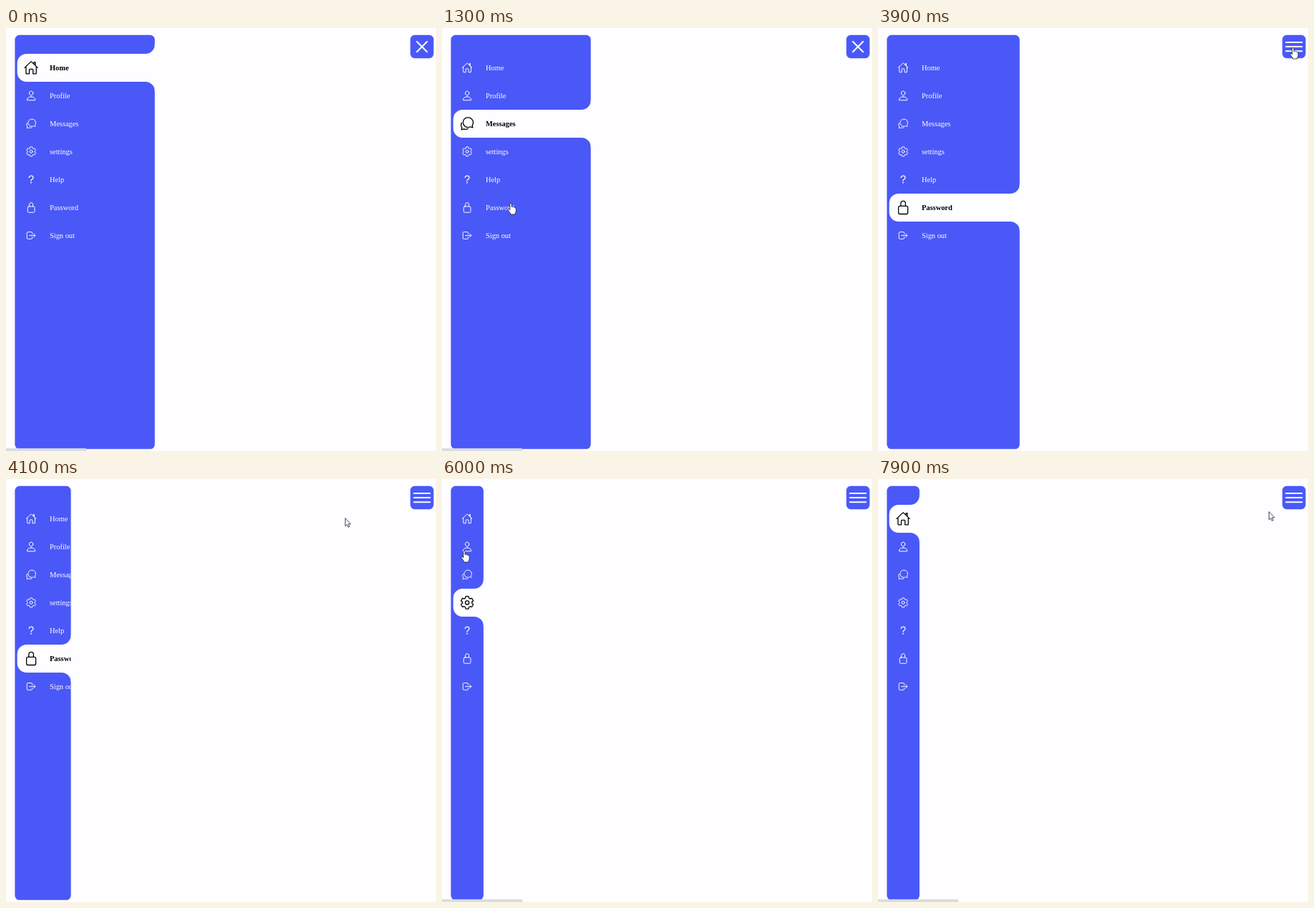
Recreate the animation shown at these times as an HTML page. Size 600 by 590 pixels, loop 8 s.

```html
<!DOCTYPE html>
<html lang="en">
<head>
<meta charset="utf-8">
<title>Sidebar menu</title>
<style>
html, body { margin: 0; width: 100%; height: 100%; overflow: hidden; background: #fefdff; }
svg { display: block; width: 600px; height: 590px; }
text { font: 10.4px "Liberation Serif", "Times New Roman", serif; }
.icon { fill: none; stroke-width: 32; stroke-linecap: round; stroke-linejoin: round; }
</style>
</head>
<body>
<svg viewBox="0 0 600 590">
  <defs><clipPath id="clip"><rect id="clipBox" x="0" y="0" height="590"/></clipPath></defs>
  <rect width="600" height="590" fill="#fefdff"/>
  <rect id="panel" x="12.4" y="9.8" height="577.5" rx="6.5" fill="#4a58f8"/>
  <path id="notch" fill="#fefdff"/>
  <g id="items" clip-path="url(#clip)"></g>
  <rect x="564.2" y="9.8" width="32.5" height="32.5" rx="6.2" fill="#4a58f8"/>
  <g class="icon" stroke="#fff" transform="translate(580.4 26.1) scale(.0635) translate(-256 -256)">
    <path id="menu" d="M80 160H432M80 256H432M80 352H432"/>
    <path id="close" d="M368 368L144 144M368 144L144 368"/>
  </g>
  <path id="status" d="M0 586.2H110.5Q112.6 586.2 112.6 588.5V590H0Z" fill="#dadce0"/>
  <g id="cursor" fill="#fff" stroke="#111" stroke-width=".75" stroke-linejoin="round">
    <path id="hand" d="M-1.2 1.2Q0-.7 1.2 1.2V5.4Q2.4 4.5 3.3 5.8Q4.5 5 5.4 6.4Q7.2 5.8 7.2 8V11.6Q7 13.6 5.9 14.6V16H-.4V14.8L-3.6 10.4Q-4.6 8.6-3.2 8.3Q-2.3 8.3-1.2 9.8Z"/>
    <path id="arrow" d="M0 0V11.2L2.5 8.9L4.1 12.7L5.9 11.9L4.3 8.3H7.7Z"/>
  </g>
</svg>
<script>
const LOOP = 8000, STEP = 100;
const LEFT = 12.4, TOP = 36, ROW = 39, WIDE = 207.6, SLIM = 57.9;
const $ = id => document.getElementById(id);

function gear() {
  const tooth = [[-60, -157], [-54, -205], [-53, -214], [-43, -214], [43, -214], [53, -214], [54, -205], [60, -157]];
  let d = "";
  for (let k = 0; k < 6; k++) {
    const c = Math.cos(k * Math.PI / 3), s = Math.sin(k * Math.PI / 3);
    const p = tooth.map(([x, y]) => (256 + x * c - y * s).toFixed(1) + " " + (256 + x * s + y * c).toFixed(1));
    d += `${k ? "L" : "M"}${p[0]}L${p[1]}Q${p[2]} ${p[3]}L${p[4]}Q${p[5]} ${p[6]}L${p[7]}`;
  }
  return `<path d="${d}Z"/><circle cx="256" cy="256" r="64"/>`;
}

const path = d => `<path d="${d}"/>`;
const rows = [
  ["Home", path("M80 212v236a16 16 0 0 0 16 16h96V328a24 24 0 0 1 24-24h80a24 24 0 0 1 24 24v136h96a16 16 0 0 0 16-16V212M480 256L267 52c-5-5-17-5-22 0L32 256M400 179V64h-48v69")],
  ["Profile", path("M344 144c-4 53-44 96-88 96s-84-43-88-96c-4-55 35-96 88-96s92 42 88 96zM256 304c-87 0-175 48-192 139C62 454 69 464 80 464h352c11 0 18-10 16-21C431 352 343 304 256 304z")],
  ["Messages", path("M431 321c-1-4 1-9 5-15A162 162 0 0 0 464 215c0-92-78-167-174-167-84 0-154 57-170 133a161 161 0 0 0-4 34c0 92 75 169 171 169 15 0 36-5 47-8s23-7 26-8a26 26 0 0 1 19 0l57 20c7 3 13-1 12-10zM66 232a146 146 0 0 0 7 153c2 3 3 6 3 8l-12 62a8 8 0 0 0 11 8l56-22a16 16 0 0 1 12 0c19 8 40 12 61 12A159 159 0 0 0 284 432")],
  ["settings", gear()],
  ["Help", `<path stroke-width="40" d="M160 164s1-33 34-59C213 89 235 84 256 84c19 0 35 3 45 8C319 100 352 121 352 164c0 46-29 66-62 89S248 298 248 324"/><circle cx="248" cy="400" r="16"/>`],
  ["Password", path("M336 208v-95a80 80 0 0 0-160 0v95") + `<rect x="96" y="208" width="320" height="272" rx="48"/>`],
  ["Sign out", path("M304 336v40a40 40 0 0 1-40 40H104a40 40 0 0 1-40-40V136a40 40 0 0 1 40-40h152c22 0 48 18 48 40v40M368 336l80-80-80-80M176 256h256")]
];

$("items").innerHTML = rows.map(([name, icon], i) =>
  `<g><g class="icon">${icon}</g><text x="61" y="${TOP + i * ROW + 22.9}">${name}</text></g>`).join("");
const items = [...$("items").children];

// [time, selected row]
const picks = [[0, 0], [700, 2], [2300, 5], [5000, 3], [6600, 0]];
// [time, x, y] of the pointer tip
const track = [
  [200, 70, 58], [600, 92, 128], [900, 92, 128], [1300, 96, 244], [2500, 96, 244],
  [3000, 578, 24], [3500, 579, 27], [3900, 579, 27], [4600, 46, 166], [5300, 46, 166],
  [6000, 31, 100], [6300, 31, 100], [6600, 32, 58], [6900, 32, 58], [7700, 526, 52], [7900, 545.6, 45.6]
];
const TOGGLE = 3860, SLIDE = 500;

// CSS "ease", solved by bisection
function ease(x) {
  if (x <= 0) return 0;
  if (x >= 1) return 1;
  const bez = (a, b, u) => 3 * a * u * (1 - u) ** 2 + 3 * b * u * u * (1 - u) + u ** 3;
  let lo = 0, hi = 1;
  for (let i = 0; i < 24; i++) {
    const mid = (lo + hi) / 2;
    if (bez(.25, .25, mid) < x) lo = mid; else hi = mid;
  }
  return bez(.1, 1, lo);
}

function pointer(t) {
  const k = track.findIndex(p => p[0] > t);
  if (k < 0) return track[track.length - 1].slice(1);
  if (k === 0) return track[0].slice(1);
  const [t0, x0, y0] = track[k - 1], [t1, x1, y1] = track[k];
  let u = (t - t0) / (t1 - t0);
  u = u * u * (3 - 2 * u);
  return [x0 + (x1 - x0) * u, y0 + (y1 - y0) * u];
}

const show = (id, on) => $(id).setAttribute("visibility", on ? "visible" : "hidden");

function draw(t) {
  const right = WIDE + (SLIM - WIDE) * ease((t - TOGGLE) / SLIDE);
  const active = picks.filter(p => p[0] <= t).pop()[1];
  const y = TOP + active * ROW;

  $("panel").setAttribute("width", right - LEFT);
  $("clipBox").setAttribute("width", right);
  $("notch").setAttribute("d",
    `M${right + 1} ${y - 13}h-1a13 13 0 0 1 -13 13H28.7a13 13 0 0 0 -13 13v13a13 13 0 0 0 13 13H${right - 13}a13 13 0 0 1 13 13h1z`);

  items.forEach((item, i) => {
    const on = i === active, [icon, label] = item.children;
    const scale = (on ? 20.8 : 15.6) / 512;
    icon.setAttribute("transform", `translate(35.1 ${TOP + i * ROW + 19.4}) scale(${scale}) translate(-256 -256)`);
    icon.setAttribute("stroke", on ? "#000" : "#fff");
    label.setAttribute("fill", on ? "#000" : "#fff");
    label.setAttribute("font-weight", on ? 700 : 400);
    label.style.fontWeight = on ? 700 : 400;
  });

  show("menu", t >= TOGGLE);
  show("close", t < TOGGLE);
  show("status", t < 2600 || t >= 5500);

  const [px, py] = pointer(t);
  const seen = t >= 200 && !(t >= 2300 && t < 2500);
  const link = (px < right && py > TOP && py < TOP + ROW * 7) || (px > 564 && py < 42);
  $("cursor").setAttribute("transform", `translate(${px} ${py})`);
  show("hand", seen && link);
  show("arrow", seen && !link);
}

function tick(now) {
  draw(Math.floor(now % LOOP / STEP) * STEP);
  requestAnimationFrame(tick);
}
draw(0);
requestAnimationFrame(tick);
</script>
</body>
</html>
```
